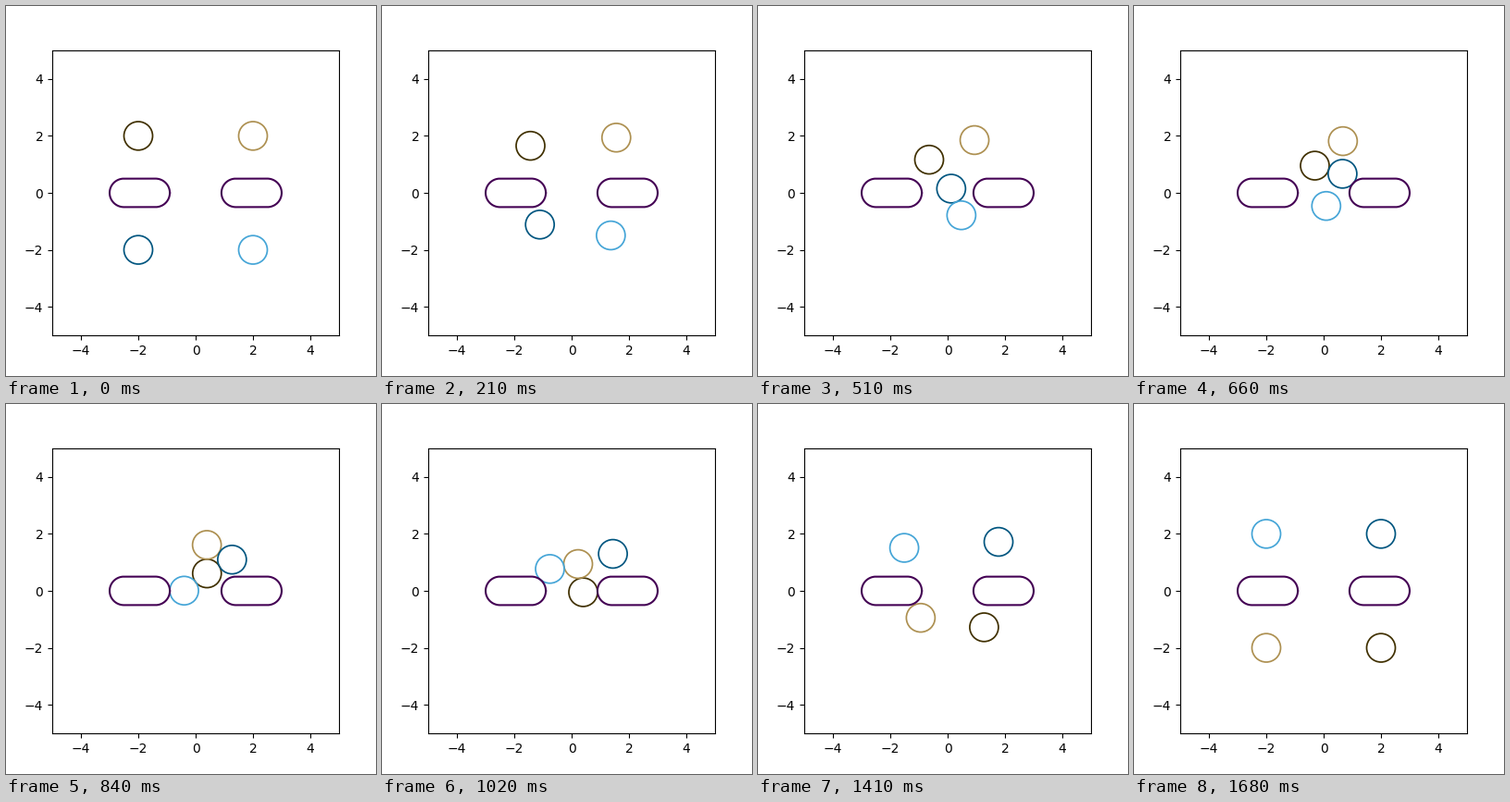
A matplotlib script for the animation above (1710 ms loop, 400 by 400 pixels).

```python
from itertools import combinations

import numpy as np
import matplotlib.pyplot as plt
from matplotlib.animation import FuncAnimation
from matplotlib.patches import Circle

STEPS = 38
TICKS = 57
RADIUS = 0.5
GAP = 2 * RADIUS
WALL = (1.4, 2.5)  # core segment of the right obstacle, mirrored on the left
COLORS = ["#403000", "#ad9051", "#005680", "#45a5d7"]

# Every disc crosses to the opposite corner through the crowded middle
START = np.array([(-2, 2), (2, 2), (-2, -2), (2, -2)], float)
ENTER = np.array([(-0.306, 0.955), (0.672, 1.815), (0.658, 0.668), (0.09, -0.46)])
LEAVE = np.array([(0.403, -0.049), (0.226, 0.942), (1.439, 1.299), (-0.758, 0.769)])
KEYS = [0, 15, 23, STEPS]


def rough_paths():
    stops = np.stack([START, ENTER, LEAVE, -START])
    s = np.arange(STEPS + 1)
    cols = [np.interp(s, KEYS, c) for c in stops.reshape(len(KEYS), -1).T]
    return np.stack(cols, axis=1).reshape(-1, *START.shape)


def push(offset, load, share):
    """Shift along the contact normal; accumulated load never goes negative."""
    dist = np.maximum(np.hypot(offset[..., 0], offset[..., 1]), 1e-6)
    step = np.maximum(-load, (GAP - dist) * share)
    load += step
    return offset * (step / dist)[..., None]


def separate(q, rounds=8):
    """Move discs the least needed to clear each other and the obstacles."""
    pairs = list(combinations(range(q.shape[1]), 2))
    pair_load = np.zeros((len(pairs), len(q)))
    wall_load = np.zeros((2,) + q.shape[:2])
    for _ in range(rounds):
        for (i, j), load in zip(pairs, pair_load):
            d = push(q[:, i] - q[:, j], load, 0.5)
            q[:, i] += d
            q[:, j] -= d
        for side, load in zip((-1, 1), wall_load):
            off = q.copy()
            off[..., 0] -= side * np.clip(side * q[..., 0], *WALL)
            q += push(off, load, 1.0)
    return q


def tighten(p, sweeps=300, relax=1.5):
    """Pull the paths taut: each free node tends to the mean of its neighbours."""
    free = np.setdiff1d(np.arange(STEPS + 1), KEYS)
    for _ in range(sweeps):
        for k in (free[free % 2 == 1], free[free % 2 == 0]):
            mean = (p[k - 1] + p[k + 1]) / 2
            p[k] = separate(p[k] + relax * (mean - p[k]))
    return p


def stadium(side):
    t = np.linspace(0, 2 * np.pi, 201)
    half = (WALL[1] - WALL[0]) / 2
    x = side * sum(WALL) / 2 + half * np.sign(np.cos(t)) + RADIUS * np.cos(t)
    return x, RADIUS * np.sin(t)


paths = tighten(rough_paths())

fig, ax = plt.subplots(figsize=(4, 4), dpi=100)
ax.set(xlim=(-5, 5), ylim=(-5, 5))
for side in (-1, 1):
    ax.plot(*stadium(side), color="#440154", lw=1.5)
discs = [ax.add_patch(Circle(xy, RADIUS, fill=False, ec=c, lw=1.25))
         for xy, c in zip(START, COLORS)]


def update(tick):
    step = -(-2 * tick // 3)  # two moves every three ticks
    for disc, xy in zip(discs, paths[step]):
        disc.center = xy
    return discs


anim = FuncAnimation(fig, update, frames=TICKS, interval=30, repeat=True)
plt.show()
```
